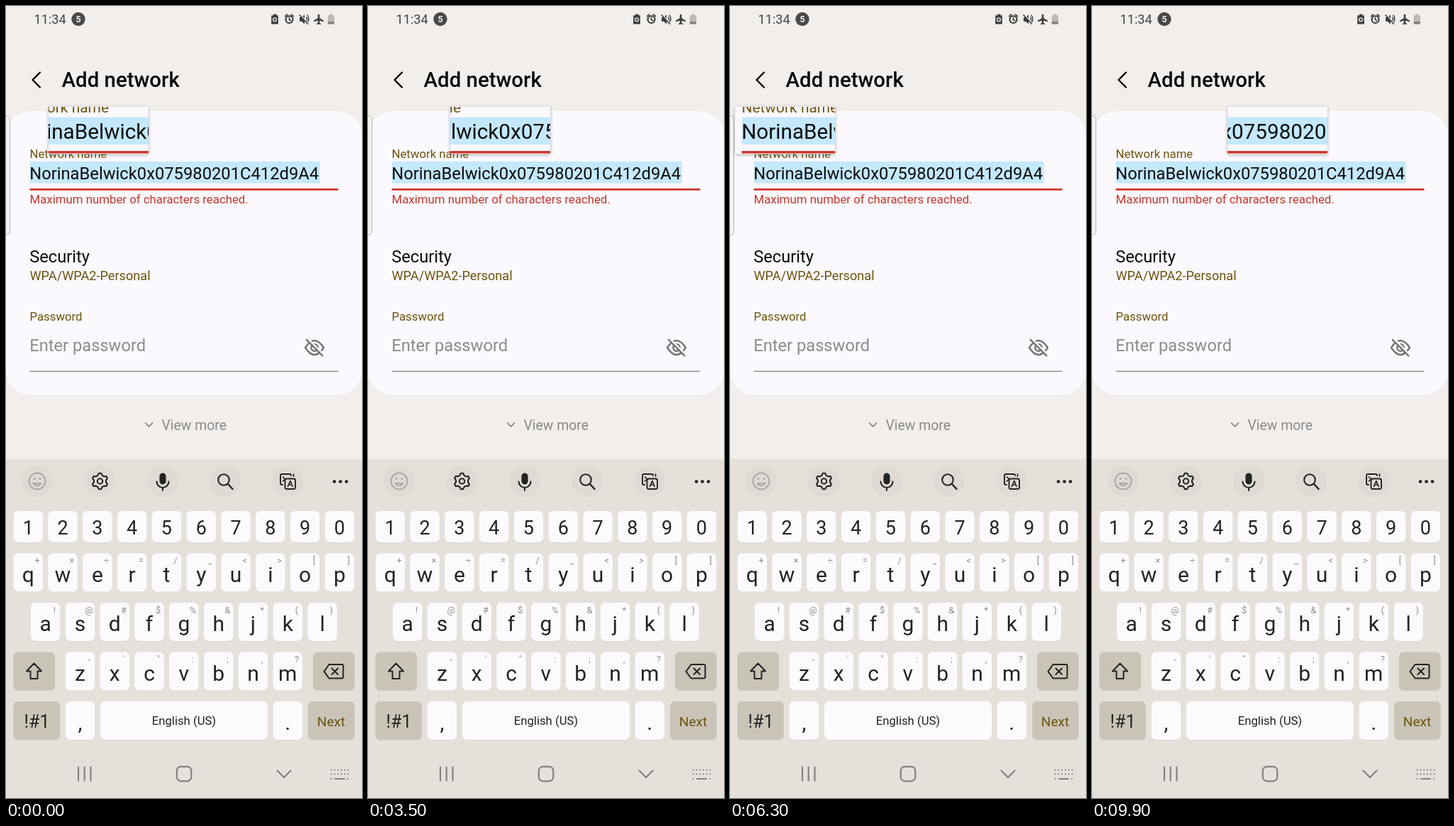
Recreate the animation shown at these times as an HTML page. Size 502 px wide and 1115 px high, loop 10 s.

```html
<!DOCTYPE html>
<html lang="en">
<head>
<meta charset="utf-8">
<title>Add network</title>
<style>
  html, body { margin: 0; width: 100%; height: 100%; overflow: hidden; background: #f1eeeb; }
  body > svg { display: block; width: 100%; height: 100%; }
  text { font-family: Roboto, "Noto Sans", sans-serif; }
  .line { fill: none; stroke: currentColor; stroke-linecap: round; stroke-linejoin: round; }
  .label { font-size: 16.75px; fill: #6d5310; }
  .body { font-size: 23.7px; }
  .mid { text-anchor: middle; }
</style>
</head>
<body>
<svg viewBox="0 0 502 1115" preserveAspectRatio="none">
  <rect width="502" height="1115" fill="#f1eeeb"/>

  <!-- status bar -->
  <text x="39.5" y="24.5" font-size="18.2" fill="#444">11:34</text>
  <circle cx="102" cy="18.5" r="9.7" fill="#4a4948"/>
  <text class="mid" x="102" y="23" font-size="12.5" font-weight="700" fill="#f1eeeb">5</text>
  <g fill="#3f3e3d" color="#3f3e3d">
    <path d="M377 11.5h4.5v1.7h2.3v12.3h-9.6v-12.3h2.8z"/>
    <circle class="line" cx="379" cy="19.3" r="2.4" style="stroke:#f1eeeb" stroke-width="1.3"/>
    <circle class="line" cx="399.5" cy="19" r="5" stroke-width="2.2"/>
    <path class="line" d="M399.5 16.500v2.800l2 1.200M393.700 14.500l3-2.500M405.300 14.500l-3-2.500" stroke-width="1.8"/>
    <path d="M414 16h3l4-3.800v13.300l-4-3.800h-3z"/>
    <path class="line" d="M423.500 16q2 2.500 0 5.500M425 13q3.500 5 .5 10" stroke-width="1.4"/>
    <path class="line" d="M415.500 12.500l11 12.500" style="stroke:#f1eeeb" stroke-width="1.6"/>
    <path class="line" d="M414 12.800l11.500 12.500" stroke-width="1.6"/>
    <path d="M439.7 12.5q1.3-2 2.6 0v4.500l5.700 3.500v1.700l-5.700-1.700v3.300l1.700 1.200v1.200l-3-.8-3 .8v-1.200l1.700-1.200v-3.300l-5.700 1.700v-1.700l5.700-3.500z"/>
    <path d="M456.2 11.5h4.3v1.7h2.3v12.3h-9v-12.3h2.4z" fill="#bbb8b5"/>
    <path d="M453.8 22h9v3.5h-9z" fill="#85827f"/>
  </g>

  <path class="line" d="M48 93.5L37.5 104L48 114.5" stroke-width="2.3"/>
  <text x="78.5" y="114.3" font-size="29.4" font-weight="500" fill="#080808">Add network</text>

  <rect y="148" width="502" height="400" rx="35" fill="#fbf9fd"/>
  <rect x="-12" y="154.5" width="17.5" height="168" rx="5" fill="#f4f3f4" stroke="#b4b2b2"/>

  <g id="field">
    <text class="label" x="33.5" y="213.8">Network name</text>
    <rect x="33.7" y="218.8" width="408.8" height="30.7" fill="#c4e8fd"/>
    <text x="33.2" y="243.5" font-size="23.75" fill="#0c0c0c">NorinaBelwick0x075980201C412d9A4</text>
    <rect x="33.5" y="256.9" width="435" height="2.7" fill="#cd3229"/>
  </g>
  <text x="33.5" y="277.8" font-size="16.82" fill="#c5352c">Maximum number of characters reached.</text>

  <text class="body" x="33.2" y="360.5" fill="#0c0c0c">Security</text>
  <text class="label" x="33.5" y="386.2" style="font-size:18.15px">WPA/WPA2-Personal</text>
  <text class="label" x="33.5" y="443.3">Password</text>
  <text class="body" x="33.2" y="486" fill="#8c8b8d">Enter password</text>
  <rect x="33.5" y="513.7" width="435" height="1.3" fill="#858487"/>
  <g class="line" color="#747376" stroke-width="2.4">
    <path d="M422 481q13-20 26 0q-13 20-26 0z"/>
    <circle cx="435" cy="481" r="4.700"/>
    <path d="M426 468.800l22 22" style="stroke:#fbf9fd"/>
    <path d="M423.800 469.800l22.500 22.500"/>
  </g>

  <path class="line" d="M196.5 587l5 5 5-5" color="#7b7978" stroke-width="1.6"/>
  <text x="219.5" y="597.3" font-size="19.4" fill="#8b8988">View more</text>

  <g id="keyboard"></g>

  <!-- toolbar -->
  <g class="line" color="#aaa6a2" stroke-width="1.9">
    <circle cx="44" cy="669" r="11.5"/>
    <path d="M38.5 672q5.5 7 11 0z"/>
    <path d="M40 665.5h.1M48 665.5h.1" stroke-width="3"/>
  </g>
  <g class="line" color="#232322" stroke-width="2.1">
    <path id="gear"/>
    <circle cx="132.5" cy="669" r="3.7"/>
    <rect x="217.5" y="658.5" width="7" height="14" rx="3.5" fill="#232322"/>
    <path d="M212.5 669.5a8.5 8.5 0 0 0 17 0M221 678v4"/>
    <circle cx="307" cy="667" r="7.8"/>
    <path d="M313 673l6.5 7" stroke-width="2.5"/>
    <path d="M390 674h-1q-2 0-2-2v-11q0-2 2-2h11q2 0 2 2" stroke-width="1.9"/>
    <rect x="393.5" y="665.5" width="14.5" height="14.5" rx="2.5" stroke-width="1.9"/>
    <path d="M397.5 676.5l3.3-8 3.3 8M398.7 674h4.2M390.5 669l3-3-3-3M405.5 662v-3" stroke-width="1.7"/>
    <path d="M463 669.5h.1M471.5 669.5h.1M480 669.5h.1" stroke-width="4.6"/>
  </g>

  <!-- shift and backspace -->
  <g class="line" color="#232322" stroke-width="2">
    <path d="M39.5 925.5l10.5 11h-5.5v10.5h-10v-10.5h-5.5z"/>
    <path d="M455.5 927h18q2 0 2 2v15.5q0 2-2 2h-18l-7-9.7z"/>
    <path d="M459.5 932.5l8.5 8.5M468 932.5l-8.5 8.5"/>
  </g>

  <!-- navigation -->
  <g class="line" color="#858180" stroke-width="2.2">
    <path d="M102 1071.5v19M110.7 1071.5v19M119.5 1071.5v19"/>
    <rect x="240.8" y="1070.8" width="20.5" height="20.5" rx="6"/>
    <path d="M382.5 1076.5l9.5 9.5 9.5-9.5"/>
    <path d="M458.5 1075.5h24M458.5 1081.5h24" stroke-dasharray=".1 4.7"/>
    <path d="M458.5 1088h.1M464 1088h13M482 1088h.1"/>
  </g>

  <g id="lens">
    <rect y="141.5" width="141" height="67" rx="2.5" fill="#fbf9fd" style="filter:drop-shadow(0 1px 2px #0005)"/>
    <svg id="zoom" y="142" width="141" height="66.5"><use href="#field"/></svg>
  </g>
</svg>

<script>
const $ = id => document.getElementById(id);
const PITCH = 48.8, KEY = 41.5, LEFT = 10.5;

const label = (x, y, s, size, fill = '#232322') =>
  `<text class="mid" x="${x}" y="${y}" font-size="${size}" fill="${fill}">${s.replace('&', '&amp;').replace('<', '&lt;')}</text>`;

const key = (x, y, w, h, fill = '#fcfafd') =>
  `<rect x="${x}" y="${y + .8}" width="${w}" height="${h}" rx="6.5" fill="#d8d3cc"/>
   <rect x="${x}" y="${y}" width="${w}" height="${h}" rx="6.5" fill="${fill}"/>`;

function row(chars, hints, offset, y, h, size, base) {
  return [...chars].map((c, i) => {
    const x = LEFT + (offset + i) * PITCH;
    const hint = hints[i] ? label(x + 33.5, y + 14.5, hints[i], 12.5, '#8d8a88') : '';
    return key(x, y, KEY, h) + label(x + KEY / 2, y + base, c, size) + hint;
  }).join('');
}

const DARK = '#cac4b8';
$('keyboard').innerHTML =
  '<rect y="638" width="502" height="477" fill="#e5e0da"/>' +
  [44, 132.5, 221, 309, 397.5].map(x => `<circle cx="${x}" cy="669" r="22" fill="#dfdad4"/>`).join('') +
  row('1234567890', '', 0, 711, 44, 27, 32.5) +
  row('qwertyuiop', '+×÷=/_<>[]', 0, 770.5, 54, 30, 40) +
  row('asdfghjkl', '!@#$%&*()', .5, 840, 54, 30, 40) +
  row('zxcvbnm', '-\'":;,?', 1.5, 909.5, 54, 30, 40) +
  key(LEFT, 909.5, 58.5, 54, DARK) + key(433, 909.5, 58.5, 54, DARK) +
  key(LEFT, 979, 65.5, 54, DARK) + label(43.5, 1015.5, '!#1', 25) +
  row(',', '', 1.5, 979, 54, 30, 40) +
  key(133, 979, 236, 54) + label(251, 1012, 'English (US)', 16.7) +
  row('.', '', 7.5, 979, 54, 30, 40) +
  key(426, 979, 65.5, 54, DARK) + label(458.5, 1013.5, 'Next', 19, '#6d5310');

// six rounded teeth
$('gear').setAttribute('d', 'M' + Array.from({ length: 24 }, (_, i) => {
  const a = (i - .5) * Math.PI / 12, r = i % 4 < 2 ? 11.3 : 8.6;
  return `${(132.5 + r * Math.sin(a)).toFixed(1)} ${(669 - r * Math.cos(a)).toFixed(1)}`;
}).join('L') + 'Z');

// lens position: [seconds, left edge]
const path = [[0, 60], [1.1, 11], [1.9, 50], [2.2, 88], [2.9, 180], [3.5, 116], [4.4, 6],
  [5.4, 51], [6.6, -1], [7.2, -1], [7.7, 44], [8.3, 205], [9, 77], [9.9, 191]];

const rate = i => (path[i + 1][1] - path[i][1]) / (path[i + 1][0] - path[i][0]);

// harmonic mean of both neighbours, flat at turning points
function slope(i) {
  if (i === 0 || i === path.length - 1) return 0;
  const a = rate(i - 1), b = rate(i);
  return a * b > 0 ? 2 * a * b / (a + b) : 0;
}

function lensX(t) {
  const i = Math.max(0, path.findIndex(p => p[0] >= t - 1e-6) - 1);
  const [t0, x0] = path[i], [t1, x1] = path[i + 1], d = t1 - t0, u = (t - t0) / d;
  return x0 + (x1 - x0) * u * u * (3 - 2 * u)
    + d * u * (1 - u) * (slope(i) * (1 - u) - slope(i + 1) * u);
}

function draw(now) {
  const t = Math.floor(now % 10000 / 100) / 10;
  const x = lensX(t), from = Math.max(26, x + 14.1);
  $('lens').setAttribute('transform', `translate(${x.toFixed(2)})`);
  $('zoom').setAttribute('viewBox', `${from.toFixed(2)} 207.2 112.8 53.2`);
}

const start = performance.now();
function tick() {
  draw(performance.now() - start);
  requestAnimationFrame(tick);
}
tick();
</script>
</body>
</html>
```
